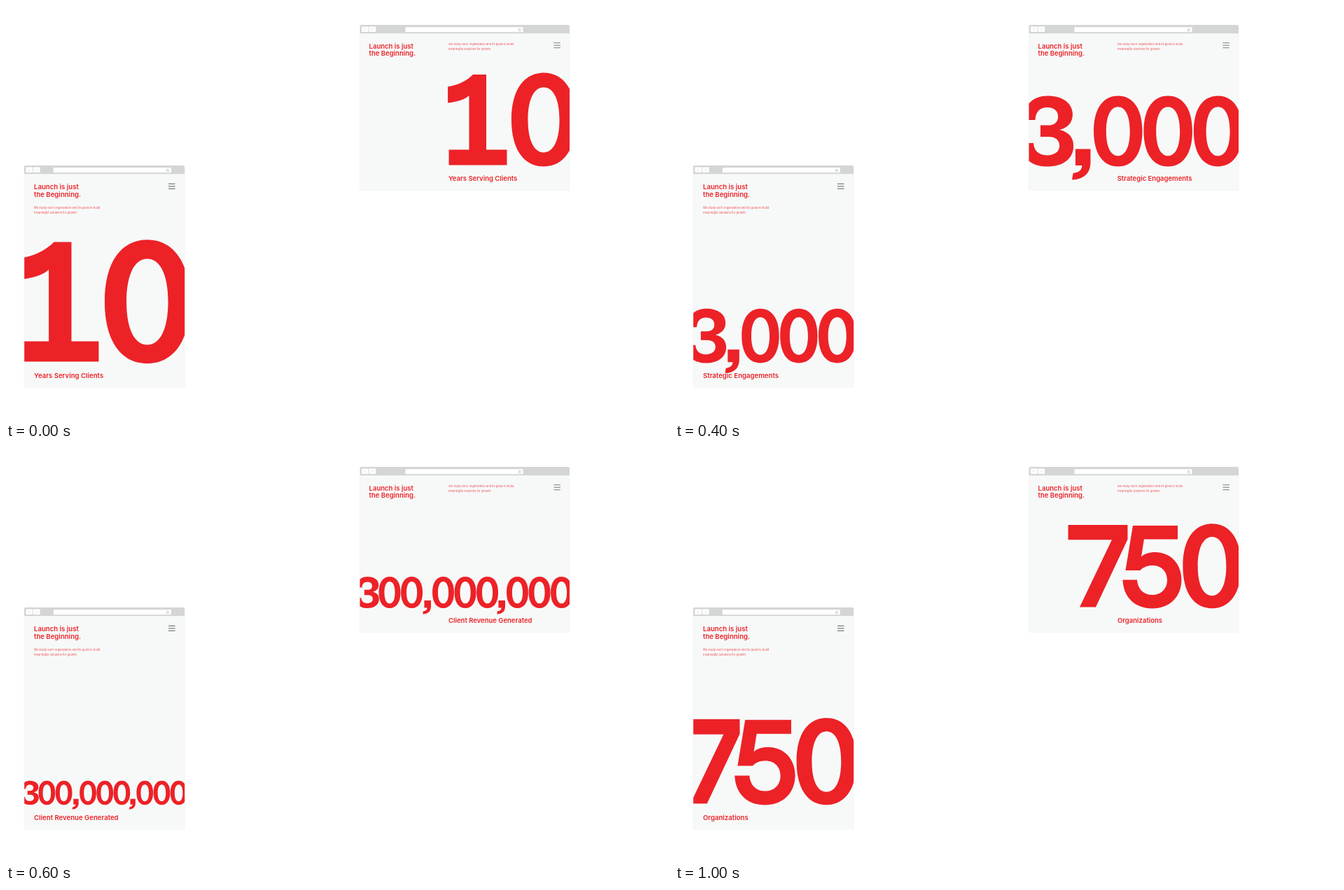
Write an HTML page that moves like this. It is 947 by 592 pixels and loops after 1.2 s.

```html
<!DOCTYPE html>
<html lang="en">
<head>
<meta charset="utf-8">
<title>Launch is just the Beginning</title>
<style>
  html, body { margin: 0; width: 100%; height: 100%; overflow: hidden; background: #fff; }
  svg { display: block; width: 947px; height: 592px; font-family: Inter, Roboto, sans-serif; }
  .red { fill: #ec2227; }
  .body { fill: #f7f9f9; stroke: #eceeee; stroke-width: .5; }
  .bar { fill: #d4d5d5; }
  .bold { font-size: 9.5px; font-weight: 600; }
  .left .bold { font-size: 9.6px; }
  .small { font-size: 4.1px; font-weight: 300; }
  .left .small { font-size: 4.15px; }

  .step { visibility: hidden; animation: 1200ms step-end infinite; }
  .years { animation-name: years; }
  .orgs { animation-name: orgs; }
  .engage { animation-name: engage; }
  .revenue { animation-name: revenue; }
  @keyframes years { 0% { visibility: visible } 16.66%, 100% { visibility: hidden } }
  @keyframes orgs {
    0%, 33.33% { visibility: hidden }
    16.66%, 83.33%, 100% { visibility: visible }
  }
  @keyframes engage {
    0%, 50%, 83.33%, 100% { visibility: hidden }
    33.33%, 66.66% { visibility: visible }
  }
  @keyframes revenue {
    0%, 66.66%, 100% { visibility: hidden }
    50% { visibility: visible }
  }
</style>
</head>
<body>
<svg viewBox="0 0 947 592">
  <defs>
    <!-- Display numerals: baseline at y = 0, the zero is 100 units tall -->
    <path id="zero" fill-rule="evenodd" d="M0-98.5C20.6-98.5 34.4-81 34.4-48.5S20.6 1.5 0 1.5-34.4-16-34.4-48.5-20.6-98.5 0-98.5ZM0-83C10-83 16.8-70.8 16.8-48.3S10-13.5 0-13.5-16.8-25.8-16.8-48.3-10-83 0-83Z"/>
    <path id="one" d="M-14.2-96.6H0V-16.4H22V0H-39.9V-16.4H-18.3V-74.3C-23-70-31-67.5-41-66.4V-83.6C-29-85.5-20-90.5-14.2-96.6Z"/>
    <path id="three" d="M-34-64.4C-33-85-20-98.5 1-98.5C22-98.5 36.6-88.5 36.6-72.3C36.6-61 30-53.5 18-50.4C31-47.5 37.8-39.5 37.8-27.5C37.8-9.5 23 1.6 .5 1.6C-21 1.6-36.5-10-36.8-31.6H-18.8C-18-20.5-11-14.4 .3-14.4C11-14.4 18-19.5 18-27.7C18-36 12.5-40.6 2-40.6H-8.9V-56.9H2C11-56.9 16-61.5 16-69.4C16-77.5 10-82.2 .5-82.2C-9.5-82.2-15.8-76-16.3-64.4Z"/>
    <path id="five" d="M-22.3-96.3H30.6V-80.2H-9.1L-12.4-59.5C-9-63-3-64.9 4-64.9C22-64.9 35.1-51.5 35.1-32.5C35.1-12 21 1.6 .5 1.6C-19.5 1.6-33.5-11-34.3-32.2H-17.4C-16.5-21-9.5-14.4 .5-14.4C11-14.4 18.2-21.5 18.2-32C18.2-42.5 11-49.2 .8-49.2C-5.5-49.2-10.5-47-13.6-43.4H-31Z"/>
    <path id="seven" d="M-70.2-97.1H0V-80L-37.6 0H-56.6L-18.6-79.6H-70.2Z"/>
    <path id="comma" d="M-21.3-23.3H0V-5C0 11-9 19.5-26.2 20.3L-24.6 11C-16.5 10-12.2 6.5-12 0H-21.3Z"/>

    <g id="n10"><use href="#one"/><use href="#zero" x="61.2"/></g>
    <g id="n750"><use href="#seven"/><use href="#five" x="28.5"/><use href="#zero" x="99.6"/></g>
    <g id="thousand">
      <use href="#comma"/><use href="#zero" x="38.9"/><use href="#zero" x="109"/><use href="#zero" x="179"/>
    </g>
    <g id="n3000">
      <use href="#three"/><use href="#comma" x="61.9"/>
      <use href="#zero" x="100.8"/><use href="#zero" x="171.5"/><use href="#zero" x="242.2"/>
    </g>
    <g id="n300m">
      <use href="#three"/><use href="#zero" x="71.6"/><use href="#zero" x="141.8"/>
      <use href="#thousand" x="202.7"/><use href="#thousand" x="438.2"/>
    </g>

    <g id="buttons">
      <path fill="#fff" d="M2.5 2.5h9.6v7.6h-9.6zM13 2.5h9.6v7.6h-9.6z"/>
      <path fill="none" stroke="#bbb" stroke-width=".6" d="M7.7 5l-1.1 1.3 1.1 1.3M17.3 5l1.1 1.3-1.1 1.3"/>
    </g>
    <g id="address">
      <path fill="#fff" d="M0 3.2h168v7H0z"/>
      <path fill="none" stroke="#bbb" stroke-width=".6" d="M161.6 6.6h3v2h-3zM162.2 6.6v-.6a.9.9 0 0 1 1.8 0v.6"/>
    </g>
    <path id="menu" fill="none" stroke="#7b7c7c" stroke-width="1.1" d="M0 0h9.5M0 3.5h9.5M0 7h9.5"/>

    <clipPath id="wide"><path d="M505.5 39H805V263.5H505.5z"/></clipPath>
    <clipPath id="tall"><path d="M26.2 240H255.2V545.3H26.2z"/></clipPath>
  </defs>

  <g class="right">
    <path class="body" d="M505.5 38H805V263.5H505.5z"/>
    <path class="bar" d="M505.5 39.2V29a2 2 0 0 1 2-2H803a2 2 0 0 1 2 2V39.2z"/>
    <use href="#buttons" x="505.5" y="27"/>
    <use href="#address" x="570.5" y="27"/>
    <use href="#menu" x="782.4" y="52.7"/>
    <g class="red">
      <text class="bold"><tspan x="518.6" y="60.9">Launch is just</tspan><tspan x="518.6" y="71.4">the Beginning.</tspan></text>
      <text class="small"><tspan x="632" y="56.4">We study each organization and its goals to build</tspan><tspan x="632" y="63">meaningful solutions for growth.</tspan></text>
      <g clip-path="url(#wide)">
        <g class="step years">
          <use href="#n10" transform="translate(686 227.5) scale(1.34)"/>
          <text class="bold" x="632" y="250.3">Years Serving Clients</text>
        </g>
        <g class="step orgs">
          <use href="#n750" transform="translate(646.5 227.5) scale(1.21)"/>
          <text class="bold" x="632" y="250.3">Organizations</text>
        </g>
        <g class="step engage">
          <use href="#n3000" transform="translate(531 228) scale(1.01)"/>
          <text class="bold" x="631.7" y="250.3">Strategic Engagements</text>
        </g>
        <g class="step revenue">
          <use href="#n300m" transform="translate(515.8 228.4) scale(.45)"/>
          <text class="bold" x="632" y="250.3">Client Revenue Generated</text>
        </g>
      </g>
    </g>
  </g>

  <g class="left">
    <path class="body" d="M26 239H255.2V545.3H26z"/>
    <path class="bar" d="M26 240.2V230a2 2 0 0 1 2-2H253.2a2 2 0 0 1 2 2V240.2z"/>
    <use href="#buttons" x="26" y="228"/>
    <use href="#address" x="67.8" y="228"/>
    <use href="#menu" x="232" y="254.4"/>
    <g class="red">
      <text class="bold"><tspan x="40" y="262">Launch is just</tspan><tspan x="40" y="272.6">the Beginning.</tspan></text>
      <text class="small"><tspan x="40" y="289.9">We study each organization and its goals to build</tspan><tspan x="40" y="296.5">meaningful solutions for growth.</tspan></text>
      <g clip-path="url(#tall)">
        <g class="step years">
          <use href="#n10" transform="translate(93.5 508.5) scale(1.77)"/>
          <text class="bold" x="40" y="532.4">Years Serving Clients</text>
        </g>
        <g class="step orgs">
          <use href="#n750" transform="translate(92.5 508.5) scale(1.244)"/>
          <text class="bold" x="40" y="532.4">Organizations</text>
        </g>
        <g class="step engage">
          <use href="#n3000" transform="translate(43.8 509.3) scale(.776)"/>
          <text class="bold" x="40" y="532.4">Strategic Engagements</text>
        </g>
        <g class="step revenue">
          <use href="#n300m" transform="translate(33.7 509.8) scale(.345)"/>
          <text class="bold" x="40" y="532.4">Client Revenue Generated</text>
        </g>
      </g>
    </g>
  </g>
</svg>
</body>
</html>
```
